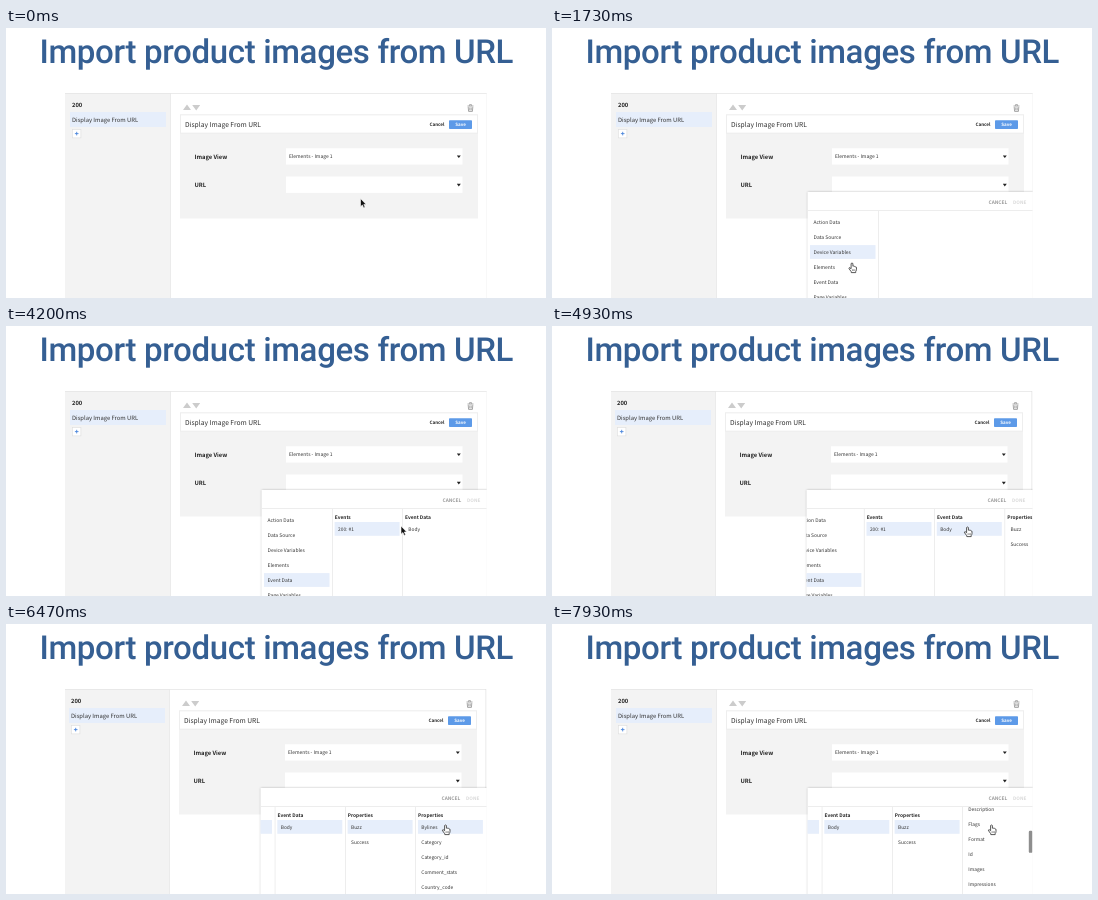
These frames come from a looping animation (540x270 px, 8 s). An HTML page:

```html
<!DOCTYPE html>
<html lang="en">
<head>
<meta charset="utf-8">
<title>Import product images</title>
<style>
html, body { margin: 0; width: 100%; height: 100%; overflow: hidden; background: #fff; }
svg { display: block; width: 540px; height: 270px; }
text { font-family: "Noto Sans CJK JP", "Noto Sans CJK SC", "Noto Sans CJK", "Noto Sans", sans-serif; fill: #333; text-rendering: geometricPrecision; white-space: pre; }
.title { font: 500 33px Roboto, Inter, sans-serif; fill: #355f93; letter-spacing: -.35px; }
.bold { font-weight: 700; fill: #222; }
</style>
</head>
<body>
<svg id="stage" viewBox="0 0 540 270" xmlns="http://www.w3.org/2000/svg">
  <defs>
    <clipPath id="appClip"><rect x="59" y="64" width="421.5" height="206"/></clipPath>
    <clipPath id="bodyClip"><rect x="255.5" y="183" width="230" height="90"/></clipPath>
    <filter id="shadow" x="-10%" y="-10%" width="120%" height="120%">
      <feDropShadow dx="0" dy="0" stdDeviation="1" flood-color="#000" flood-opacity=".28"/>
    </filter>
  </defs>
  <rect width="540" height="270" fill="#fff"/>
  <text class="title" x="33.5" y="35">Import product images from URL</text>
  <g clip-path="url(#appClip)">
    <g id="app"></g>
  </g>
  <g id="arrow">
    <path d="M0 0V8.2L1.9 6.5 3.2 9.4 4.6 8.8 3.3 6H5.7Z" fill="#111" stroke="#fff" stroke-width=".6"/>
  </g>
  <g id="hand">
    <path d="M-.9 .5Q0-.5.9.5V3.2Q1.7 2.7 2.3 3.4 3 3 3.5 3.8 4.5 3.7 4.5 4.8V6.5Q4.4 7.8 3.7 8.6V9.6H-.7V8.8L-2.9 5.8Q-3.4 4.7-2.4 4.6L-.9 5.7Z" fill="#fff" stroke="#222" stroke-width=".75" stroke-linejoin="round"/>
    <path d="M.5 6.2V8M1.7 6.2V8M2.9 6.2V8" stroke="#333" stroke-width=".45"/>
  </g>
</svg>
<script>
const LOOP = 8000, STEP = 1000 / 15, PITCH = 70.3, ROW = 15;
const BLUE = '#e6eefb', LINE = '#e6e6e6';
const $ = id => document.getElementById(id);

function add(parent, tag, attrs, text) {
  const el = document.createElementNS('http://www.w3.org/2000/svg', tag);
  for (const k in attrs) el.setAttribute(k, attrs[k]);
  if (text) el.textContent = text;
  parent.appendChild(el);
  return el;
}
const group = (p, attrs = {}) => add(p, 'g', attrs);
const rect = (p, x, y, width, height, fill, more = {}) =>
  add(p, 'rect', { x, y, width, height, fill, ...more });
const path = (p, d, fill, more = {}) => add(p, 'path', { d, fill, ...more });

// Text placed by the middle of its capitals.
function label(p, x, cy, size, text, bold, color) {
  const el = add(p, 'text', { x, y: cy + size * .37, 'font-size': size }, text);
  if (bold) el.setAttribute('class', 'bold');
  if (color) el.style.fill = color;
  return el;
}

function buildPage(app) {
  rect(app, 50, 65, 440, 210, '#fff');
  rect(app, 50, 65, 114, 210, '#f3f3f3');
  rect(app, 164, 65, .8, 210, LINE);
  rect(app, 50, 65, 431, .8, LINE);
  rect(app, 480.6, 65, .8, 210, '#ddd');

  label(app, 66, 77, 5.8, '200', true);
  rect(app, 64, 84, 96, 15, BLUE);
  label(app, 66, 91.5, 5.85, 'Display Image From URL');
  rect(app, 66.3, 101.3, 8.6, 8.6, '#fff', { stroke: '#ddd', 'stroke-width': .6 });
  path(app, 'M68.9 105.6h3.6M70.7 103.8v3.6', 'none', { stroke: '#4a86dc', 'stroke-width': .9 });

  path(app, 'M177 82l4-5.5 4 5.5zM186.2 77h8l-4 5.5z', '#ccc');
  path(app, 'M461.5 78h6M463.5 77.6v-.9h2v.9M462.2 79l.4 4.4h3.8l.4-4.4M463.8 79.4v3M465.2 79.4v3',
    'none', { stroke: '#888', 'stroke-width': .75 });

  rect(app, 174, 86.5, 298, 104, '#f3f3f3');
  rect(app, 174.4, 86.9, 297.2, 18.2, '#fff', { stroke: '#ececec', 'stroke-width': .8 });
  label(app, 179, 96.5, 6.72, 'Display Image From URL');
  label(app, 423.5, 96.7, 4.55, 'Cancel', true);
  rect(app, 443, 92.3, 23, 8.7, '#5d9ae8', { rx: .8 });
  label(app, 449.2, 96.6, 4.5, 'Save', true, '#fff');

  [['Image View', 128.5], ['URL', 156.8]].forEach(([name, y]) => {
    label(app, 188.5, y, 5.8, name, true);
    rect(app, 280, y - 8.3, 176.5, 16.4, '#fff');
    path(app, `M450.8 ${y - 1}h4l-2 2.6z`, '#222');
  });
  label(app, 283, 128.2, 4.95, 'Elements - Image 1');
}

const COLUMNS = [
  { at: 2660, pick: 3260, head: 'Events', rows: ['200: #1'] },
  { at: 3530, pick: 4390, head: 'Event Data', rows: ['Body'] },
  { at: 4460, pick: 5260, head: 'Properties', rows: ['Buzz', 'Success'] },
  { at: 5730, pick: 6390, head: 'Properties', rows: ['Bylines', 'Category', 'Category_id',
    'Comment_stats', 'Country_code', 'Description', 'Flags', 'Format', 'Id', 'Images', 'Impressions', 'Language'] }
];

function buildColumn(parent, col, i) {
  const x = 326 + PITCH * i;
  const g = group(parent);
  if (i) rect(g, x, 183, .7, 90, LINE);
  const list = group(g);
  const mark = rect(list, x + 2.6, 196, 65, 13.8, BLUE);
  label(list, x + 2.8, 191, 4.85, col.head, true);
  col.rows.forEach((r, k) => label(list, x + 6, 203.3 + ROW * k, 4.85, r));
  return { ...col, g, list, mark };
}

const app = $('app');
buildPage(app);
const popup = group(app);
rect(popup, 255.8, 164, 240, 130, '#fff', { filter: 'url(#shadow)' });
label(popup, 436.5, 174, 4.8, 'CANCEL', true, '#999');
label(popup, 461, 174, 4.7, 'DONE', true, '#d8d8d8');
rect(popup, 256, 182.3, 230, .7, LINE);
const body = group(popup, { 'clip-path': 'url(#bodyClip)' });
const strip = group(body);
const hover = rect(strip, 258, 0, 65.5, 13.8, BLUE);
['Action Data', 'Data Source', 'Device Variables', 'Elements', 'Event Data', 'Page Variables']
  .forEach((s, i) => label(strip, 261.5, 194.2 + ROW * i, 4.95, s));
rect(strip, 326, 183, .7, 90, LINE);
const columns = COLUMNS.map((c, i) => buildColumn(strip, c, i));
const thumb = rect(popup, 476.8, 0, 3.6, 22, '#8e8e8e', { rx: 1.2 });

// Tracks: [time, ...values], eased between neighbours.
const POINTER = [
  [0, 354.5, 170.5], [70, 354.5, 170.5], [270, 351, 158], [935, 351, 158],
  [1400, 322, 196], [1667, 302, 229], [1733, 300, 235], [1800, 299, 239],
  [2200, 299, 239], [2533, 287, 256], [2600, 287, 256], [2733, 288, 249.5],
  [2933, 288, 249.5], [3200, 352, 209], [3333, 350, 206], [3933, 350, 206],
  [4200, 395, 200], [4400, 415.5, 201], [5333, 415.5, 201], [5667, 437.5, 199.5],
  [5800, 439.5, 201]
];
const OPEN = [[270, 110], [667, 0]];
const SLIDE = [[4800, 0], [5267, 56.3], [5940, 56.3], [6400, 126.6]];
const SCROLL = [[7133, 0], [7933, 92.7]];
// Switches: [time, value], held until the next.
const SHAPE = [[0, 'arrow'], [200, 'hand'], [460, 'arrow'], [1390, 'hand'],
  [2990, 'arrow'], [3260, 'hand'], [3990, 'arrow'], [4260, 'hand']];
const LIST_ROW = [[0, -1], [1390, 0], [1520, 1], [1660, 2], [1790, 3], [2390, 4]];
const NUDGE = [[0, 0], [4930, -1], [5260, 0], [6060, -1], [6660, 0]];

function track(keys, t) {
  let i = keys.findIndex(k => k[0] > t);
  if (i === 0) return keys[0].slice(1);
  if (i < 0) return keys[keys.length - 1].slice(1);
  const a = keys[i - 1], b = keys[i];
  const p = (t - a[0]) / (b[0] - a[0]);
  const e = p + (p * p * (3 - 2 * p) - p) * .6;
  return a.slice(1).map((v, k) => v + (b[k + 1] - v) * e);
}
const held = (keys, t) => keys.filter(k => k[0] <= t).pop()[1];
const show = (el, on) => el.setAttribute('visibility', on ? 'inherit' : 'hidden');
const move = (el, x, y) => el.setAttribute('transform', `translate(${x} ${y})`);

function draw(t) {
  move(app, held(NUDGE, t), 0);
  show(popup, t > 270);
  move(popup, 0, track(OPEN, t)[0]);
  move(strip, -track(SLIDE, t)[0], 0);

  const row = held(LIST_ROW, t);
  show(hover, row >= 0);
  hover.setAttribute('y', 187.1 + ROW * row);
  for (const c of columns) {
    show(c.g, t >= c.at);
    show(c.mark, t >= c.pick);
  }

  const s = track(SCROLL, t)[0];
  move(columns[3].list, 0, -s);
  show(thumb, s > 0);
  thumb.setAttribute('y', 186 + s * .225);

  const [x, y] = track(POINTER, t), shape = held(SHAPE, t);
  for (const id of ['arrow', 'hand']) {
    show($(id), id === shape);
    move($(id), x, y);
  }
}

const start = performance.now();
function tick() {
  const t = (performance.now() - start) % LOOP;
  draw(Math.floor((t + 5) / STEP) * STEP);
  requestAnimationFrame(tick);
}
tick();
</script>
</body>
</html>
```
